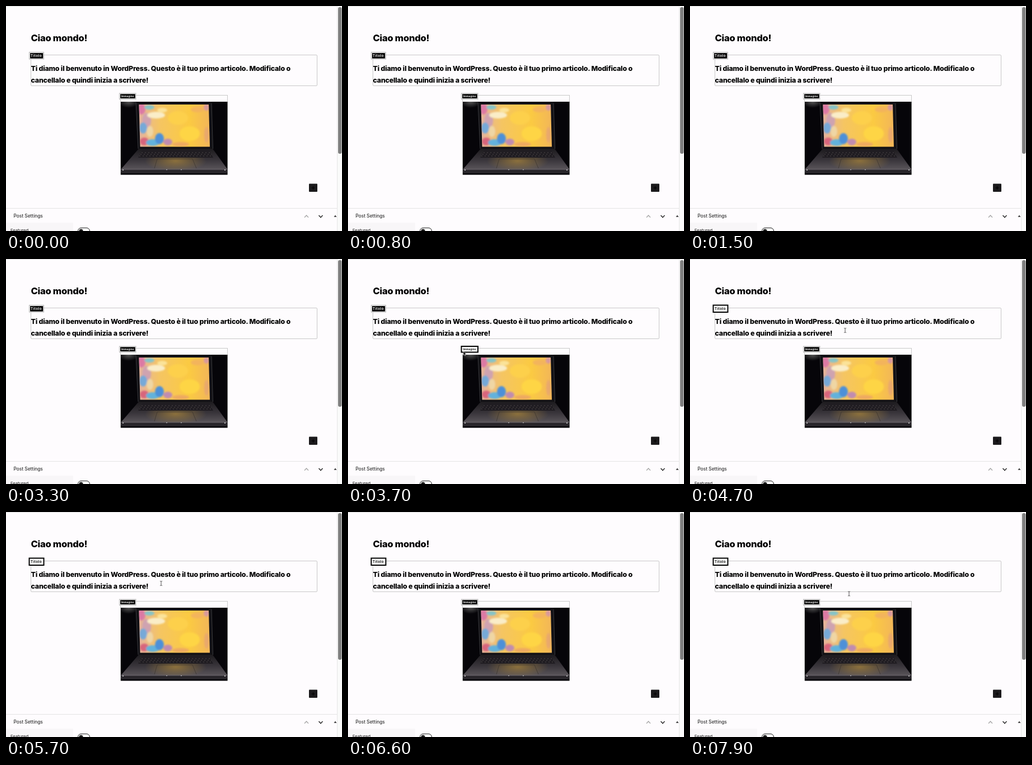
These frames come from a looping animation (600x402 px, 8000 ms). An HTML page:

```html
<!DOCTYPE html>
<html lang="it">
<head>
<meta charset="utf-8">
<title>Editor</title>
<style>
  html, body { margin: 0; width: 100%; height: 100%; overflow: hidden; background: #fefcfe; }
  svg { display: block; width: 100%; height: 100%; }
  text { font-family: Inter, "Noto Sans", sans-serif; white-space: pre; }
  .title { font-size: 16.6px; font-weight: 800; letter-spacing: -.0165em; }
  .heading { font-size: 12.4px; font-weight: 800; letter-spacing: -.0165em; }
  .panel { font-size: 8.3px; font-weight: 500; fill: #333; }
  .block { fill: none; stroke: #c8c8c8; }
  .label .ring { fill: #fff; stroke: #b0b0b0; stroke-width: .9; }
  .label text { font-weight: 700; letter-spacing: .1em; fill: #fff; }
  .label.active .ring { stroke: #000; stroke-width: 2; }
  .label.active .fill { fill: none; }
  .label.active text { fill: #000; }
</style>
</head>
<body>
<svg viewBox="0 0 600 402">
  <defs>
    <linearGradient id="deck" x2="0" y2="1">
      <stop offset="0" stop-color="#1d1b1e"/>
      <stop offset=".5" stop-color="#38343a"/>
      <stop offset="1" stop-color="#5d585d"/>
    </linearGradient>
    <linearGradient id="wallpaper">
      <stop offset="0" stop-color="#e5b3a0"/>
      <stop offset=".3" stop-color="#f5c562"/>
      <stop offset=".7" stop-color="#fbca42"/>
      <stop offset="1" stop-color="#f2b55a"/>
    </linearGradient>
    <radialGradient id="glow">
      <stop offset="0" stop-color="#555"/>
      <stop offset="1" stop-color="#555" stop-opacity="0"/>
    </radialGradient>
    <radialGradient id="reflection">
      <stop offset="0" stop-color="#a5823c" stop-opacity=".75"/>
      <stop offset="1" stop-color="#a5823c" stop-opacity="0"/>
    </radialGradient>
    <filter id="soft"><feGaussianBlur stdDeviation="1.8"/></filter>
    <clipPath id="screen"><path d="M237.5 176H362L364 251.5H239.5Z"/></clipPath>
    <clipPath id="photo"><rect x="205" y="171" width="190.5" height="130.5"/></clipPath>
  </defs>

  <rect width="600" height="402" fill="#fefcfe"/>
  <path d="M0 .5H591" stroke="#e2e2e2"/>

  <text class="title" x="44.5" y="63">Ciao mondo!</text>
  <rect class="block" x="44.5" y="87.5" width="511" height="55" rx="1.5"/>
  <text class="heading" x="44.5" y="116">Ti diamo il benvenuto in WordPress. Questo è il tuo primo articolo. Modificalo o</text>
  <text class="heading" x="44.5" y="137">cancellalo e quindi inizia a scrivere!</text>

  <rect class="block" x="204.5" y="159.5" width="191" height="141.5"/>
  <g clip-path="url(#photo)">
    <rect x="205" y="171" width="191" height="131" fill="#060509"/>
    <ellipse cx="219" cy="171" rx="18" ry="11" fill="url(#glow)"/>
    <path d="M232 171H367L370 256H236Z" fill="#121115"/>
    <path d="M232 172L236 255M367 174L369.5 255" stroke="#45464a" stroke-width=".8"/>
    <g clip-path="url(#screen)">
      <rect x="236" y="175" width="130" height="78" fill="url(#wallpaper)"/>
      <g id="blobs" filter="url(#soft)"></g>
    </g>
    <path d="M237 255H369L395 291V294H205V292Z" fill="url(#deck)"/>
    <ellipse cx="303" cy="277" rx="55" ry="19" fill="url(#reflection)"/>
    <path d="M243 258H363L370 271H236Z" fill="#201d22"/>
    <path d="M242 262H365M240 265H367M238 268H369" stroke="#5b5554" stroke-width=".8" stroke-dasharray="2 4"/>
    <path d="M270 273H333M265 290L270 273M340 290L333 273" stroke="#39332f" stroke-width=".7"/>
    <path d="M205 292H395V297Q394 299 390 299H210Q206 299 205 297Z" fill="#29262b"/>
    <path d="M206 292H394" stroke="#77727a" stroke-width=".8"/>
    <g fill="#ddd"><circle cx="209" cy="293" r="1"/><circle cx="287" cy="292.5" r=".8"/><circle cx="313" cy="292.5" r=".8"/><circle cx="391" cy="293" r="1"/></g>
  </g>

  <g class="label" id="headingLabel">
    <rect class="ring" x="41.5" y="82.5" width="26" height="12.5"/>
    <rect class="fill" x="43" y="84" width="23.2" height="9.7"/>
    <text x="44" y="91" font-size="6">Titolo</text>
  </g>
  <g class="label" id="imageLabel">
    <rect class="ring" x="202.5" y="156" width="29.5" height="10.5"/>
    <rect class="fill" x="204" y="157.3" width="26.8" height="7.8"/>
    <text x="205.5" y="162.7" font-size="4.2">Immagine</text>
  </g>

  <rect x="541" y="317.5" width="15" height="14.5" rx="1" fill="#1b1a1c"/>
  <path d="M545.5 325H551.5M548.5 322V328" stroke="#000"/>

  <path d="M0 361.5H591" stroke="#e4e3e4"/>
  <text class="panel" x="13.5" y="378">Post Settings</text>
  <g fill="none" stroke-width="1.3">
    <path d="M533 377.8L536.5 374L540 377.8" stroke="#a5a5a5"/>
    <path d="M558.5 374L562 377.8L565.5 374" stroke="#1e1e1e"/>
  </g>
  <path d="M585.5 377L588 373.5L590.5 377Z" fill="#444"/>
  <rect y="387" width="120" height="15" fill="#f8f6f8"/>
  <text class="panel" x="8" y="404" style="font-size:7.6px">Featured</text>
  <rect x="128.5" y="396.5" width="21" height="11" rx="5.5" fill="#fff" stroke="#1e1e1e"/>
  <circle cx="134" cy="402" r="3.6" fill="#1e1e1e"/>

  <rect x="591" width="9" height="402" fill="#fafafa"/>
  <path d="M591.5 0V402" stroke="#e6e6e6"/>
  <rect x="593" y="2" width="6.5" height="262" rx="3.2" fill="#7f7f7f"/>

  <path id="arrow" d="M0 0V7L1.7 5.5L2.9 8L4.1 7.4L3 5H5.2Z" stroke="#fff" stroke-width=".5"/>
  <path id="beam" d="M-2 -4Q0 -4 0 -3Q0 -4 2 -4M0 -3V3M-2 4Q0 4 0 3Q0 4 2 4" fill="none" stroke="#444" stroke-width=".9"/>
</svg>
<script>
const byId = id => document.getElementById(id);

// Wallpaper colours: x, y, horizontal radius, vertical radius, colour
const blobs = [
  [242, 184, 7, 10, '#dc7aa4'], [251, 205, 8, 14, '#cfa3b0'],
  [245, 218, 7, 10, '#76a9d8'], [257, 224, 6, 10, '#efd6a4'],
  [247, 242, 8, 7, '#d8657c'], [262, 244, 12, 6, '#62b2dc'],
  [274, 237, 8, 10, '#4d90d8'], [289, 243, 8, 6, '#c08cb0'],
  [268, 195, 16, 6, '#faedc8'], [279, 186, 9, 4, '#fbe39a'],
  [256, 181, 9, 4, '#86c4c8'], [307, 200, 18, 12, '#fdd04c'],
  [328, 228, 18, 13, '#fed544'], [342, 185, 12, 5, '#f3b45c'],
  [358, 181, 5, 6, '#d99a9c'], [358, 230, 4, 14, '#e9a86c'],
  [312, 247, 15, 4, '#eeaa60']
];
byId('blobs').innerHTML = blobs.map(([x, y, rx, ry, color]) =>
  `<ellipse cx="${x}" cy="${y}" rx="${rx}" ry="${ry}" fill="${color}"/>`).join('');

// Pointer path: time, x, y
const path = [
  [3500, 275, 215], [3600, 230, 184], [3700, 206, 165], [3800, 216, 150],
  [3900, 230, 140], [4100, 254.5, 130], [4400, 270, 128], [4700, 277, 127.5]
];

function pointerAt(time) {
  if (time >= 7900) return [284, 146];
  if (time < 3500 || time >= 6600) return null;
  const next = path.findIndex(([t]) => t > time);
  if (next < 0) return path.at(-1).slice(1);
  const [t0, x0, y0] = path[next - 1], [t1, x1, y1] = path[next];
  const k = (time - t0) / (t1 - t0);
  return [x0 + (x1 - x0) * k, y0 + (y1 - y0) * k];
}

function place(id, point) {
  const shape = byId(id);
  shape.style.display = point ? '' : 'none';
  if (point) shape.setAttribute('transform', `translate(${point})`);
}

function draw(now) {
  const time = Math.floor(now % 8000 / 100) * 100;
  const overImage = time >= 3500 && time < 3800;
  const inHeading = time >= 3900;
  const point = pointerAt(time);
  byId('imageLabel').classList.toggle('active', overImage);
  byId('headingLabel').classList.toggle('active', inHeading);
  place('arrow', !inHeading && point);
  place('beam', inHeading && point);
}

const start = performance.now();
function tick() {
  draw(performance.now() - start);
  requestAnimationFrame(tick);
}
tick();
</script>
</body>
</html>
```
